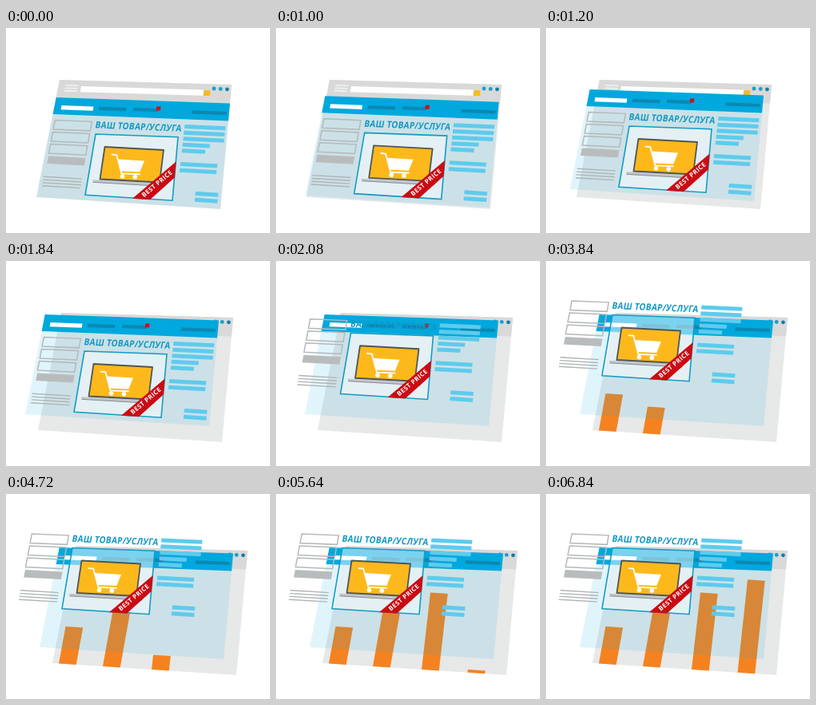
Animation, 330 px wide and 257 px high, one loop 9.64 s. Source, as an HTML page:

```html
<!DOCTYPE html>
<html lang="ru">
<head>
<meta charset="utf-8">
<title>Слои страницы</title>
<style>
html, body { margin: 0; width: 100%; height: 100%; overflow: hidden; background: #fff; }
svg { display: block; width: 330px; height: 257px; }
text { font-family: "Open Sans", "Noto Sans", sans-serif; font-weight: 700; }
</style>
</head>
<body>
<svg viewBox="0 0 330 257">
  <g id="shell">
    <polygon points="67,65 282,71 268,227 38,212" fill="#e7e8e8"/>
    <polygon points="67,65 282,71 280,94.5 62.7,87" fill="#d9d9d9"/>
    <g id="shellBars"></g>
    <circle cx="260" cy="76" r="2.4" fill="#189fcb"/>
    <circle cx="268.2" cy="76.4" r="2.4" fill="#189fcb"/>
    <circle cx="276.4" cy="76.8" r="2.4" fill="#0b7fa9"/>
  </g>
  <g id="chart" fill="#f58220"></g>
  <g id="page">
    <polygon points="58.6,108 278,116.5 268,227 38,212" fill="#00aadc" fill-opacity=".12"/>
    <polygon points="62.7,87 280,94.5 278,116.5 58.6,108" fill="#00a8dd"/>
    <g id="pageBars"></g>
  </g>
  <g id="content">
    <g id="contentBars"></g>
    <text transform="matrix(.87 .036 -.18 1 111 125.3)" font-size="11.5" letter-spacing=".35" fill="#1097c4">ВАШ ТОВАР/УСЛУГА</text>
    <polygon points="112,133 215,136.8 208,216.2 99,209.3" fill="#fff" fill-opacity=".48" stroke="#159bc6" stroke-width="1.6"/>
    <polygon points="108,190.3 201,194.8 199,199 109,193.8" fill="#c3c7c9"/>
    <polyline points="108.5,193.3 199,198.6" fill="none" stroke="#8b8f91"/>
    <polygon points="123.5,149 197,153 192,193.5 117.5,189.5" fill="#fdb91c" stroke="#4f5558" stroke-width="1.8" stroke-linejoin="round"/>
    <g fill="#fff">
      <polygon points="139.5,164.5 173,166.5 167.3,180.5 144.3,179.5"/>
      <polyline points="132.5,158.6 138.3,159.2 144.5,182.4 167,183.4" fill="none" stroke="#fff" stroke-width="1.8" stroke-linejoin="round" stroke-linecap="round"/>
      <circle cx="145.5" cy="186" r="2.8"/>
      <circle cx="161.3" cy="186.8" r="2.8"/>
    </g>
    <polygon points="158,213.7 212.6,167.4 210.8,187.5 180,215.2" fill="#cb0b13"/>
    <text transform="translate(172.6 212.6) rotate(-40.5)" font-size="8" letter-spacing=".4" fill="#fff">BEST PRICE</text>
  </g>
</svg>
<script>
const LOOP = 9640, STEP = 40;
const el = id => document.getElementById(id);

function poly(parent, points, attrs) {
  const p = document.createElementNS("http://www.w3.org/2000/svg", "polygon");
  p.setAttribute("points", points.map(n => n.toFixed(2)).join(" "));
  for (const k in attrs) p.setAttribute(k, attrs[k]);
  parent.appendChild(p);
  return p;
}

// A rectangle that follows the perspective of the tilted sheet.
const slope = y => .028 + (y - 65) / 147 * .037;
const lean = x => -.197 + (x - 50) / 220 * .107;
function bar(parent, x, y, w, h, fill, attrs) {
  const xr = x + w, yr = y + w * slope(y);
  poly(parent, [x, y, xr, yr, xr + lean(xr) * h, yr + h, x + lean(x) * h, y + h], { fill, ...attrs });
}

const shellBars = el("shellBars"), pageBars = el("pageBars"), contentBars = el("contentBars");

for (let i = 0; i < 3; i++) bar(shellBars, 74.5 - i * .8, 71 + i * 3.4, 16, 1.6, "#f3f3f3");
bar(shellBars, 94, 73, 153, 7.2, "#fff");
bar(shellBars, 247.5, 78, 8, 6.8, "#f8ba1d");

bar(pageBars, 69.5, 97, 40, 5.2, "#fff");
for (const [x, y, w] of [[116.5, 98.8, 34], [159.5, 99.8, 31], [233, 103.3, 43]])
  bar(pageBars, x, y, w, 4.2, "#0b88b3");
bar(pageBars, 188.3, 98.2, 5.2, 5, "#d0101a");

const outline = { stroke: "#b5b9ba", "stroke-width": 1.5 };
for (let i = 0; i < 3; i++) bar(contentBars, 61.3 - i * 2.8, 115.5 + i * 15, 46, 11.5, "none", outline);
bar(contentBars, 53, 160.5, 46.5, 9.5, "#b9bcbd");
for (let i = 0; i < 4; i++) bar(contentBars, 47 - i * .6, 185.6 + i * 3.8, 48, 1.4, "#b0b4b5");

const lines = [
  [223.5, 121, 51], [222.6, 128.7, 51], [221.8, 136.3, 51], [221, 143.8, 34], [220.2, 151.2, 29],
  [218.3, 168, 46], [217.4, 175.8, 46], [237, 205, 28.5], [236.2, 212.8, 28.5]
];
for (const [x, y, w] of lines) bar(contentBars, x, y, w, 5, "#5ecbed");

const linear = p => p;
const easeOut = p => 1 - (1 - p) ** 2;
const columns = [
  { x: 66, h: 46.5, shift: 8.5, from: 2600, to: 3520, ease: linear },
  { x: 121, h: 69.5, shift: 12.5, from: 3560, to: 4560, ease: easeOut },
  { x: 182, h: 96.5, shift: 11, from: 4560, to: 5400, ease: linear },
  { x: 239.5, h: 116.5, shift: 12.5, from: 5600, to: 6840, ease: linear }
];
for (const c of columns) c.node = poly(el("chart"), [0, 0]);

const progress = (t, from, to) => Math.min(1, Math.max(0, (t - from) / (to - from)));
const move = (id, x, y) => el(id).setAttribute("transform", `translate(${x} ${y})`);

function growColumn(c, t) {
  const p = c.ease(progress(t, c.from, c.to));
  c.node.style.display = p > 0 ? "" : "none";
  const y = 212 + (c.x - 58) * .065, dx = c.shift * p, top = y - c.h * p;
  const points = [c.x, y, c.x + dx, top, c.x + 21.7 + dx, top + 1.4, c.x + 21.7, y + 1.4];
  c.node.setAttribute("points", points.map(n => n.toFixed(2)).join(" "));
}

function draw(time) {
  const t = Math.floor(time % LOOP / STEP) * STEP;
  const lift = progress(t, 960, 1440);
  const split = progress(t, 1840, 2320);
  const pan = 20 * progress(t, 1800, 2200);
  const x = pan - 16 * lift, y = -20 * lift;
  move("shell", pan, 0);
  move("page", x, y);
  move("content", x - 33 * split, y - 45.5 * split);
  for (const c of columns) growColumn(c, t);
}

const start = performance.now();
function tick() {
  draw(performance.now() - start);
  requestAnimationFrame(tick);
}
tick();
</script>
</body>
</html>
```
